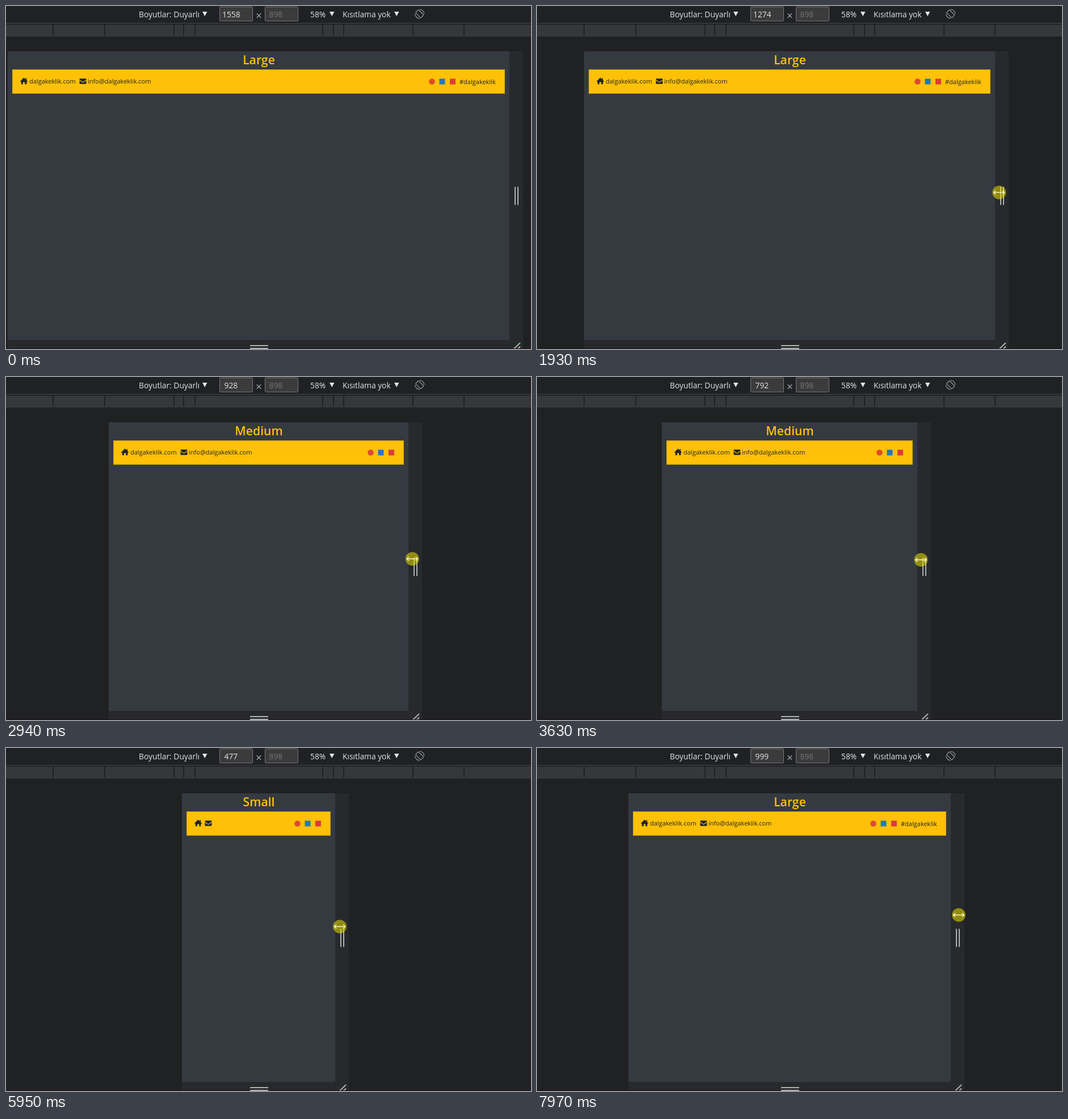
Write an HTML page that moves like this. It is 925 px wide and 606 px high and loops after 8000 ms.

```html
<!DOCTYPE html>
<html lang="tr">
<head>
<meta charset="utf-8">
<title>Responsive bar</title>
<style>
  html, body { margin: 0; width: 100%; height: 100%; overflow: hidden; background: #202123; }
  svg { display: block; width: 925px; height: 606px; }
  text { font-family: "Open Sans", "Noto Sans", sans-serif; white-space: pre; }
  .tool { font-size: 13.8px; fill: #e3e4e6; }
  .bar { font-size: 11px; fill: #212529; }
  .title { font-size: 21.2px; font-weight: 600; fill: #ffc107; text-anchor: middle; }
  .field { fill: #3b3b3b; stroke: #77787a; }
  .grip { fill: none; stroke: #b0b1b1; stroke-width: 2; }
  .dark { fill: #212529; }
</style>
</head>
<body>
<svg viewBox="0 0 925 606">
  <rect width="925" height="606" fill="#202123"/>

  <!-- device frame and page -->
  <rect id="frame" y="80" height="526" fill="#28292c"/>
  <rect id="page" y="80" height="510" fill="#353a41"/>
  <text id="title" class="title" x="445.5" y="103"></text>
  <rect id="strip" y="112.5" height="42" fill="#ffc107" stroke="#cda016"/>

  <g id="left">
    <path class="dark" d="M22 133 28.5 126.6 31.4 129.4V127.4H33.2V131.2L35.2 133 34.2 134.1 33.4 133.5V138.3H30.2V134.6H26.9V138.3H23.8V133.5L23 134.1Z"/>
    <text class="bar wide" x="38" y="137">dalgakeklik.com</text>
    <g id="mail">
      <rect class="dark" x="126.5" y="128.2" width="12" height="9.6" rx="1.4"/>
      <path d="M126.5 130.8 131.4 134.3Q132.5 135 133.6 134.3L138.5 130.8" fill="none" stroke="#ffc107" stroke-width="1.1"/>
    </g>
    <text class="bar wide" x="141" y="137">info@dalgakeklik.com</text>
  </g>

  <g id="right">
    <g id="social">
      <circle cx="-136.5" cy="133.5" r="5.3" fill="#dc4a38"/>
      <rect x="-123.5" y="128.5" width="10" height="10" fill="#2478b8"/>
      <rect x="-105" y="128.5" width="10" height="10" fill="#dc3b3b"/>
    </g>
    <text id="tag" class="bar" x="-88" y="137.5">#dalgakeklik</text>
    <path class="grip" d="M10 319.5V351.5M15 319.5V351.5"/>
    <path class="grip" d="M7 606.5 19 595M14 606.5 19 601.5"/>
  </g>

  <rect y="605" width="925" height="1" fill="#20141d"/>
  <path class="grip" d="M430 600H462M430 605H462"/>

  <!-- toolbar and ruler -->
  <rect width="925" height="30" fill="#202124"/>
  <rect y="30" width="925" height="1" fill="#48494c"/>
  <rect y="33" width="925" height="21" fill="#36373a"/>
  <path d="M83 33V52M174 33V52M296 33V52M313 33V52M333 33V52M558 33V52M577 33V52M595 33V52M717 33V52M807 33V52" stroke="#202124" stroke-width="2"/>
  <text class="tool" x="234" y="19.5">Boyutlar: Duyarlı</text>
  <text class="tool" x="536" y="19.5">58%</text>
  <text class="tool" x="593" y="19.5">Kısıtlama yok</text>
  <path d="M346 10H354.5L350.2 18ZM570 10H578.5L574.2 18ZM684 10H692.5L688.2 18Z" fill="#e3e4e6"/>
  <rect class="field" x="376.5" y="1.5" width="58" height="25" rx="1"/>
  <rect class="field" x="456.5" y="1.5" width="58" height="25" rx="1"/>
  <text id="count" class="tool" y="19.5"></text>
  <text class="tool" x="463.5" y="19.5" style="fill:#747576">898</text>
  <path d="M441.8 13.3 449.2 20.7M449.2 13.3 441.8 20.7" stroke="#a0a1a3" stroke-width="1.4"/>
  <g transform="translate(728.7 13.8)" fill="none" stroke="#97989a" stroke-width="1.2">
    <rect x="-3.6" y="-6.6" width="7.2" height="13.2" rx="1" transform="rotate(-45)"/>
    <path d="M0 -8A8 8 0 0 1 8 0M0 8A8 8 0 0 1 -8 0"/>
  </g>

  <g id="cursor">
    <circle r="12" fill="#e8e000" fill-opacity=".55"/>
    <path d="M-9.5 0H9.5M-6 -3.5 -9.5 0 -6 3.5M6 -3.5 9.5 0 6 3.5" fill="none" stroke="#fff6c4" stroke-width="1.4"/>
  </g>
</svg>
<script>
const LOOP = 8000, MID = 445.5, ZOOM = 0.568;

// [ms, value] pairs
const widths = [[1230, 1558], [1390, 1461], [2000, 1250], [2460, 1124], [2870, 942],
  [3630, 792], [3700, 772], [4330, 632], [4530, 632], [4880, 575], [5400, 509],
  [5900, 470], [6230, 513], [6930, 655], [7070, 672], [7900, 970], [7970, 999]];
const grabX = [[1230, 8], [1390, 7.5], [3630, 6.5], [4880, 7], [6930, 9], [7970, 14]];
const grabY = [[1120, 340], [1390, 339], [2460, 320], [3630, 323], [4880, 320], [6930, 311.5], [7970, 295]];

const $ = id => document.getElementById(id);
const wide = document.querySelectorAll('.wide');

function at(keys, t) {
  const i = keys.findIndex(k => k[0] > t);
  if (i === 0) return keys[0][1];
  if (i < 0) return keys[keys.length - 1][1];
  const [t0, a] = keys[i - 1], [t1, b] = keys[i];
  return a + (b - a) * (t - t0) / (t1 - t0);
}

function span(el, x, w) {
  el.setAttribute('x', x);
  el.setAttribute('width', w);
}

function move(el, x, y = 0) {
  el.setAttribute('transform', `translate(${x} ${y})`);
}

function show(el, on) {
  el.style.display = on ? '' : 'none';
}

function pointer(t, right) {
  if (t < 170) return null;
  if (t < 235) return [916, 532];
  if (t < 300) return [922, 475];
  if (t < 570) return null;
  if (t < 1120) return [at([[570, 921], [780, 897]], t), 337];
  return [right + at(grabX, t), at(grabY, t)];
}

function draw(t) {
  const px = Math.round(at(widths, t));
  const half = px * ZOOM / 2;
  const left = Math.floor(MID - half), right = Math.floor(MID + half), w = right - left;
  const large = px >= 992, medium = px >= 768;

  span($('frame'), left, w + 24);
  span($('page'), left, w);
  span($('strip'), left + 8.5, w - 17);
  move($('left'), left);
  move($('right'), right);

  $('title').textContent = large ? 'Large' : medium ? 'Medium' : 'Small';
  $('count').textContent = px;
  $('count').setAttribute('x', px > 999 ? 381 : 384.5);
  wide.forEach(el => show(el, medium));
  move($('mail'), medium ? 0 : -86);
  show($('tag'), large);
  move($('social'), large ? 0 : 70);

  const p = pointer(t, right);
  show($('cursor'), p);
  if (p) move($('cursor'), ...p);
}

function tick() {
  draw(performance.now() % LOOP);
  requestAnimationFrame(tick);
}
tick();
</script>
</body>
</html>
```
